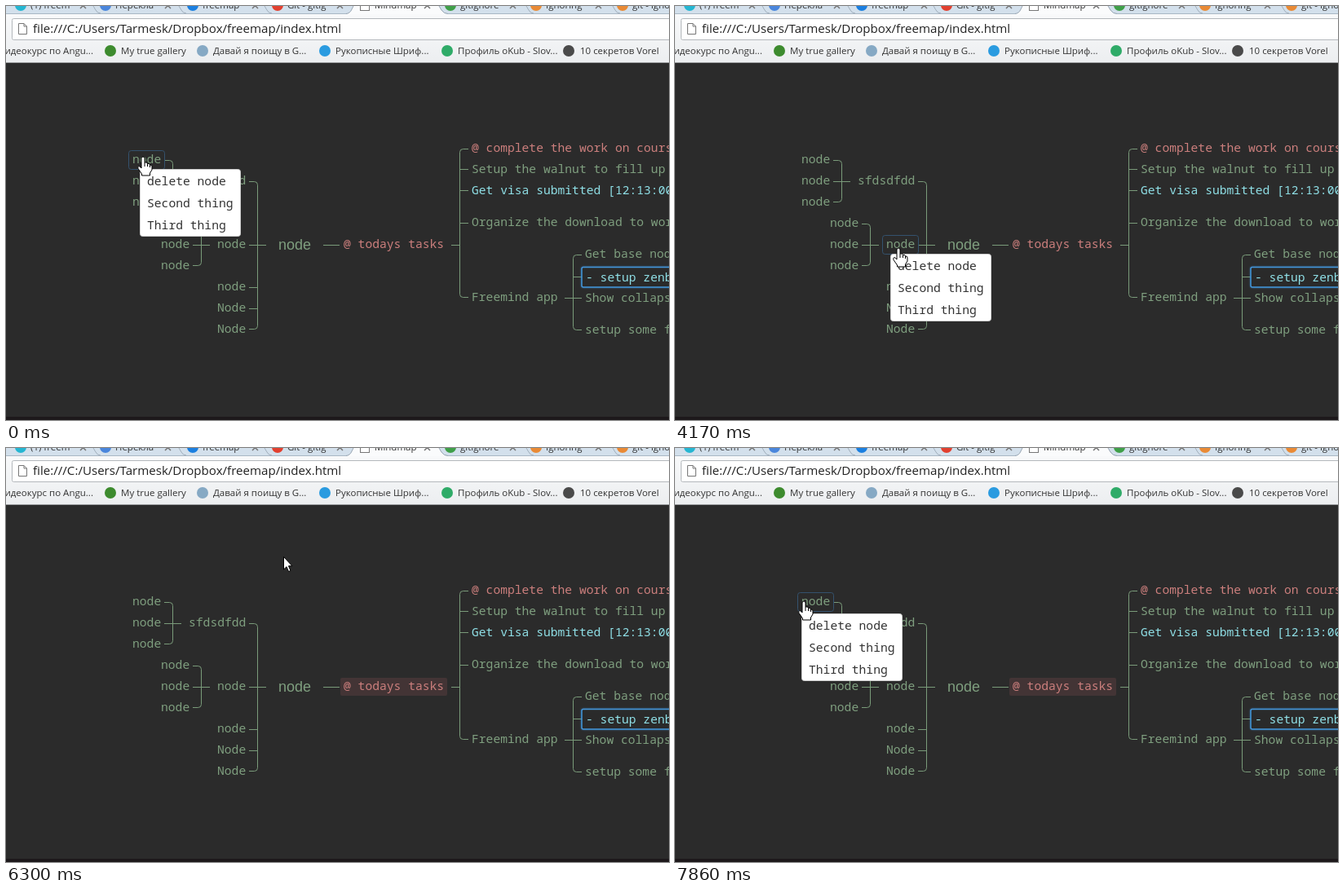
Recreate the animation shown at these times as an HTML page. Size 813 by 508 pixels, loop 8000 ms.

```html
<!DOCTYPE html>
<html lang="en">
<head>
<meta charset="utf-8">
<title>Mind map</title>
<style>
html, body { margin: 0; width: 100%; height: 100%; overflow: hidden; background: #2b2b2b; }
svg { display: block; width: 813px; height: 508px; }
text { white-space: pre; }
.ui { font: 11.5px "Open Sans", "Noto Sans", sans-serif; fill: #333; }
.url { font: 15.1px "Open Sans", "Noto Sans", sans-serif; fill: #222; }
.mono { font: 14.667px "Noto Sans Mono", "DejaVu Sans Mono", monospace; fill: #7f9f7f; }
.root { font: 18px "Liberation Sans", Arial, sans-serif; fill: #7f9f7f; }
.mono.red { fill: #cc7f7d; }
.mono.cyan { fill: #8fdfe6; }
.mono.item { fill: #333; }
.ui.off { fill: #999; }
.end { text-anchor: end; }
.links { fill: none; stroke: #7a9b7a; }
</style>
</head>
<body>
<svg id="stage" viewBox="0 0 813 508">
  <defs>
    <linearGradient id="bar" x2="0" y2="1">
      <stop stop-color="#fafbfc"/><stop offset="1" stop-color="#eceef0"/>
    </linearGradient>
    <filter id="shadow" x="-5%" y="-5%" width="110%" height="112%">
      <feDropShadow dx="2" dy="2" stdDeviation="1.5" flood-opacity=".5"/>
    </filter>
    <filter id="glow" x="-10%" y="-40%" width="120%" height="180%">
      <feDropShadow dx="0" dy="0" stdDeviation="1.2" flood-color="#3f8fd8" flood-opacity=".6"/>
    </filter>
  </defs>
</svg>
<script>
const stage = document.getElementById('stage');

function add(tag, attrs, parent = stage) {
  const el = document.createElementNS('http://www.w3.org/2000/svg', tag);
  for (const key in attrs) el.setAttribute(key, attrs[key]);
  return parent.appendChild(el);
}
const rect = (x, y, width, height, fill, more, parent) =>
  add('rect', { x, y, width, height, fill, ...more }, parent);
const path = (d, more, parent) => add('path', { d, ...more }, parent);
const dot = (cx, cy, r, fill, parent) => add('circle', { cx, cy, r, fill }, parent);
function label(x, y, text, cls, parent) {
  add('text', { x, y, class: cls }, parent).textContent = text;
}
const show = (el, on) => el.setAttribute('visibility', on ? 'visible' : 'hidden');

function drawBrowser() {
  rect(0, 0, 813, 70, 'url(#bar)');
  rect(0, 0, 813, 10, '#d3e0ec');
  path('M0 9.5H418M542 9.5H813', { stroke: '#a9b7c4' });
  path('M417 10Q422 9 424 4L426 0H531L534 5Q537 10 542 10Z', { fill: '#fafbfc' });
  path('M417 9.5Q422 9 424 4L426 0M531 0L534 5Q537 9.5 542 9.5', { fill: 'none', stroke: '#98a5b2' });
  for (const x of [107, 212, 317, 638, 744]) {
    path(`M${x} 0L${x + 3} 5Q${x + 5} 9 ${x + 9} 9`, { fill: 'none', stroke: '#a0aebb' });
  }
  const tabs = [
    [18, '#25b6d2', '(1) freem'], [122, '#4a86dc', 'Перекла'], [229, '#1b7fe0', 'freemap'],
    [333, '#e2402f', 'Git - gitig'], [440, '#fff', 'Mindmap'], [545, '#3f9f49', 'gitignore'],
    [650, '#e98a35', 'Ignoring'], [756, '#e98a35', 'git - igno']
  ];
  for (const [x, color, name] of tabs) {
    if (color === '#fff') rect(x - 5.5, -6.5, 11, 12, color, { stroke: '#777' });
    else dot(x, -1, 7, color);
    label(x + 12, 3, name, 'ui');
    path(`M${x + 73} -4l7 7m0 -7l-7 7`, { stroke: '#777', 'stroke-width': 1.5 });
  }
  rect(7.5, 15.5, 830, 26, '#fff', { stroke: '#b4b8bc', rx: 2 });
  path('M15.5 21.5H22L25.5 25V34.5H15.5ZM22 21.5V25H25.5', { fill: '#fff', stroke: '#777' });
  label(33, 33, 'file:///C:/Users/Tarmesk/Dropbox/freemap/index.html', 'url');

  label(107, 59, 'Видеокурс по Angu...', 'ui end');
  const bookmarks = [
    [128, '#3d8b2e', 'My true gallery', 141], [241, '#86a9c4', 'Давай я поищу в G...', 254],
    [391, '#2a9be0', 'Рукописные Шриф...', 404], [541, '#2fab68', 'Профиль oKub - Slov...', 554],
    [690, '#4a4a4a', '10 секретов Vorel', 704]
  ];
  for (const [x, color, name, tx] of bookmarks) {
    dot(x, 55, 7, color);
    label(tx, 59, name, 'ui');
  }
  rect(0, 69, 813, 1, '#9a9c9e');
}

function drawMap() {
  rect(0, 70, 813, 438, '#2b2b2b');
  rect(0, 504, 813, 4, '#1d191b');
  const texts = [
    [155, 193, 'node'], [155, 219, 'node'], [155, 245, 'node'], [224, 219, 'sfdsdfdd'],
    [190, 271, 'node'], [190, 297, 'node'], [190, 323, 'node'], [259, 297, 'node'],
    [259, 349, 'node'], [259, 375, 'Node'], [259, 401, 'Node'],
    [571, 179, '@ complete the work on course', 'red'],
    [571, 205, 'Setup the walnut to fill up '],
    [571, 231, 'Get visa submitted [12:13:00]', 'cyan'],
    [571, 270, 'Organize the download to work'],
    [571, 362, 'Freemind app'], [710, 309, 'Get base node'],
    [710, 363, 'Show collapse'], [710, 402, 'setup some fi']
  ];
  for (const [x, y, text, color = ''] of texts) label(x, y, text, 'mono ' + color);
  label(334, 299, 'node', 'root');

  // A bracket joins its first and last rows; side points from the spine to the rows.
  const bracket = (x, top, bottom, side) =>
    `M${x + side * 10.5} ${top}h${-side * 6.5}Q${x} ${top} ${x} ${top + 4}V${bottom - 4}` +
    `Q${x} ${bottom} ${x + side * 4} ${bottom}h${side * 6.5}`;
  const ticks = (x, length, ...rows) => rows.map(y => `M${x} ${y}h${length}`).join('');
  path([
    bracket(204.5, 189.5, 240.5, -1), ticks(194, 21, 215.5),
    bracket(239.5, 267.5, 318.5, -1), ticks(229, 21, 293.5),
    bracket(308.5, 215.5, 396.5, -1), ticks(298, 21, 293.5), ticks(298, 10, 345.5, 371.5),
    ticks(389, 20, 293.5), ticks(546, 10, 293.5),
    bracket(556.5, 175.5, 357.5, 1), ticks(557, 10, 200.5, 226.5, 266.5),
    bracket(695.5, 305.5, 397.5, 1), ticks(695, 11, 332.5), ticks(685, 21, 358.5)
  ].join(''), { class: 'links' });

  rect(706, 320.5, 160, 24.5, '#2b2b2b', { rx: 2, stroke: '#4296dc', 'stroke-width': 1.5, filter: 'url(#glow)' });
  label(711, 338, '- setup zenburn', 'mono cyan');
}

function drawNativeMenu() {
  const g = add('g');
  rect(198.5, 121.5, 411, 268, '#fdfdfd', { stroke: '#b5b5b5', filter: 'url(#shadow)' }, g);
  const rows = [
    [141, 'Назад', 'Alt+Курсор ліворуч', 'off'], [164, 'Переслати', 'Alt+Курсор праворуч', 'off'],
    [187, 'Оновити', 'Ctrl+R'], [221, 'Зберегти як...', 'Ctrl+S'], [244, 'Друк...', 'Ctrl+P'],
    [267, 'Перекласти такою мовою: українська'], [290, 'Переглянути джерело сторінки', 'Ctrl+U'],
    [313, 'Переглянути інформацію про сторінку'], [347, 'JSONView'],
    [381, 'Перевірити елемент', 'Ctrl+Shift+I']
  ];
  for (const [y, name, keys = '', state = ''] of rows) {
    label(234, y, name, 'ui ' + state, g);
    label(586, y, keys, 'ui off end', g);
  }
  for (const y of [198, 324, 358]) rect(199, y, 410, 1, '#e2e2e2', {}, g);
  dot(216, 342, 8, '#8fadcb', g);
  path('M596 338l4 4l-4 4Z', { fill: '#555' }, g);
  return g;
}

function drawPopup() {
  const g = add('g');
  rect(.5, .5, 123, 82, '#fff', { rx: 3, stroke: '#cfcfcf' }, g);
  const hover = rect(1, 1, 122, 27, '#e8e8e8', {}, g);
  ['delete node', 'Second thing', 'Third thing'].forEach((text, i) =>
    label(9, 20 + 27 * i, text, 'mono item', g));
  return { g, hover };
}

drawBrowser();
drawMap();
const tint = rect(410, 282, 131, 22, '#433435', { rx: 2 });
label(414, 297, '@ todays tasks', 'mono red');
const outline = rect(0, 0, 44, 23, 'none', { rx: 3, stroke: '#34526e' });
const popup = drawPopup();
const nativeMenu = drawNativeMenu();
const ink = { fill: '#fff', stroke: '#000', 'stroke-linejoin': 'round' };
const arrow = path('M.5 .5V16L4 12.7L6.6 18.6L9 17.5L6.5 11.8H11Z', ink);
const hand = add('g');
path('M-2 14V2Q-2 0 0 0T2 2V7Q5 6 5.5 8.5Q8 7.5 8.5 10Q11 9.5 11 12V16L8.5 20V23H-1.5V21L-6 14.5Q-7 12 -5 11.5Q-4 11.5 -2 14Z', ink, hand);
path('M2 7V12M5.5 8.5V12M8.5 10V13', { stroke: '#000', fill: 'none' }, hand);

const NODES = [[150.5, 177.5], [254.5, 281.5]];
const MENUS = [[164, 200], [264, 304], [155, 203]];

// time, pointer x, pointer y, then only the parts on show
const STEPS = [
  [0, 168, 185, { node: 0, menu: 0 }],
  [1050, 184, 214, { menu: 0, hover: 0 }],
  [1310, 192, 241, { menu: 0, hover: 1 }],
  [1570, 198, 269, { menu: 0, hover: 2 }],
  [1850, 262, 240, { menu: 0, hover: 1 }],
  [2100, 345, 200, { menu: 0 }],
  [2350, 391, 172, { menu: 0 }],
  [2600, 391, 172, {}],
  [2880, 366, 211, {}],
  [3150, 300, 262, {}],
  [3400, 269, 288, { node: 1 }],
  [3650, 268, 289, { node: 1, menu: 1 }],
  [3920, 270, 292, { node: 1, menu: 1 }],
  [4170, 274, 297, { node: 1, menu: 1 }],
  [4450, 283, 318, { menu: 1, hover: 0 }],
  [4720, 320, 345, { menu: 1, hover: 1 }],
  [4970, 403, 288, { menu: 1, tint: 5 }],
  [5220, 404, 205, { menu: 1, tint: 5 }],
  [5490, 376, 166, { menu: 1, tint: 131 }],
  [5740, 349, 141, { tint: 131 }],
  [6020, 340, 133, { tint: 131 }],
  [6550, 290, 128, { tint: 131 }],
  [6800, 198, 121, { tint: 131 }],
  [7050, 198, 121, { tint: 131, native: true }],
  [7330, 168, 176, { tint: 131, native: true }],
  [7580, 157, 186, { tint: 131, native: true }],
  [7860, 158, 188, { node: 0, menu: 2, tint: 131 }]
];
const LOOP = 8000;

function place(el, [x, y]) {
  el.setAttribute('transform', `translate(${x} ${y})`);
}

function render(time) {
  const [, x, y, { node, menu, hover, tint: width = 0, native = false }] =
    STEPS.findLast(step => step[0] <= time);
  const overNode = node !== undefined;
  show(outline, overNode);
  if (overNode) place(outline, NODES[node]);
  show(popup.g, menu !== undefined);
  if (menu !== undefined) place(popup.g, MENUS[menu]);
  show(popup.hover, hover !== undefined);
  if (hover !== undefined) popup.hover.setAttribute('y', 1 + 27 * hover);
  tint.setAttribute('width', width);
  show(nativeMenu, native);
  show(arrow, !overNode);
  show(hand, overNode);
  place(overNode ? hand : arrow, [x, y]);
}

const start = performance.now();
function tick() {
  render((performance.now() - start) % LOOP);
  requestAnimationFrame(tick);
}
tick();
</script>
</body>
</html>
```
